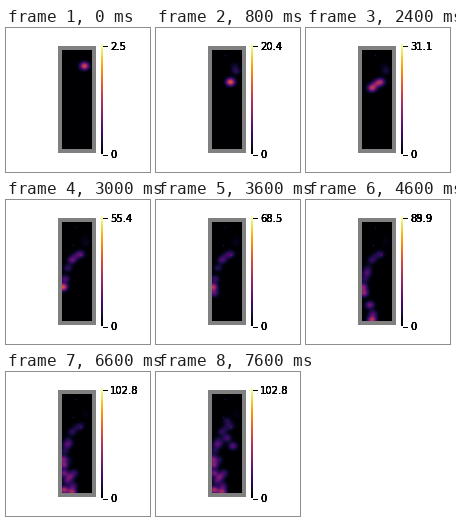
Write a matplotlib script that moves like this. It is 144 by 144 pixels and loops after 8000 ms.

```python
import numpy as np
import matplotlib.pyplot as plt
from matplotlib.animation import FuncAnimation
from matplotlib.patches import Rectangle

SIZE, STEP, LOOP = 144, 200, 8000
LEFT, RIGHT, TOP, BOTTOM = 56, 86, 22, 121
GROWTH = 400

# Deposits along the walk: time of full height, x, y, height
DEPOSITS = [
    (0, 78.5, 38, 1.4), (400, 80, 43, 3), (800, 74.5, 54, 12.5),
    (2200, 70, 56, 8), (2400, 66, 60, 15), (2800, 62, 68, 9),
    (3000, 59, 79, 13), (3000, 57, 87, 33),
    (3800, 58, 93, 34), (4000, 64, 105, 27), (4200, 67, 114, 20),
    (4400, 66, 120, 44), (4600, 61, 73, 20), (5400, 64, 71, 9),
    (5600, 61, 109, 20), (5800, 58, 118, 46),
    (6200, 58, 101, 30), (6400, 68, 101, 18), (6800, 63, 88, 12),
    (7200, 71, 66, 22), (7400, 77, 74, 26), (7600, 71, 49, 13),
]
SPECKS = [(200, 69, 27), (2600, 67, 45), (3000, 75, 55)]
SCALE = [(0, 2.5), (800, 20.4), (2400, 31.1), (3000, 55.4), (4400, 85.9),
         (4600, 89.9), (5800, 98.8), (6400, 102.8)]

xs, ys = np.meshgrid(np.arange(LEFT, RIGHT) + 0.5, np.arange(TOP, BOTTOM) + 0.5)


def bump(x, y, sx=3.0, sy=2.6):
    return np.exp(-((xs - x) / sx) ** 2 / 2 - ((ys - y) / sy) ** 2 / 2)


def clock(frame):
    t = frame * STEP
    return 1200 if 1200 <= t < 1800 else min(t, 7600)


def scale_max(t):
    return np.interp(t, *zip(*SCALE))


def density(t):
    field = sum(h * np.clip(1 + (t - full) / GROWTH, 0, 1) * bump(x, y)
                for full, x, y, h in DEPOSITS) / scale_max(t)
    return field + sum(0.13 * (t >= start) * bump(x + 0.5, y + 0.5, 0.6, 0.6)
                       for start, x, y in SPECKS)


fig = plt.figure(figsize=(2, 2), dpi=72, facecolor="white")
ax = fig.add_axes([0, 0, 1, 1])
ax.axis("off")

ax.add_patch(Rectangle((52, 17.5), 38, 107.5, color="#808080", lw=0))
heat = ax.imshow(density(0), cmap="inferno", vmin=0, vmax=1, aspect="auto",
                 extent=(LEFT, RIGHT, BOTTOM, TOP), interpolation="nearest", zorder=2)
ax.imshow(np.linspace(1, 0, 256)[:, None], cmap="inferno", aspect="auto",
          extent=(95, 97, 126.5, 17), interpolation="bilinear", zorder=2)
for y in (17.5, 126.5):
    ax.plot([97, 101], [y, y], color="black", lw=1)
ax.set(xlim=(0, SIZE), ylim=(SIZE, 0))


def heavy_label(y, text, layers=5):
    """Overprinted text, which hardens its soft edges."""
    return [ax.text(104, y, text, fontsize=10, family="DejaVu Sans",
                    va="center_baseline") for _ in range(layers)]


heavy_label(126.5, "0")
top_label = heavy_label(17.5, "")
ghost_label = heavy_label(17.5, "", 3)


def update(frame):
    t = clock(frame)
    heat.set_data(density(t))
    for label in top_label:
        label.set_text(f"{scale_max(t):.1f}")
    overlap = 4200 <= t < 6400
    for label in ghost_label:
        label.set_text(f"{scale_max(t - STEP):.1f}" if overlap else "")
    return [heat, *top_label, *ghost_label]


anim = FuncAnimation(fig, update, frames=LOOP // STEP, interval=STEP,
                     repeat=True, repeat_delay=0, blit=False)
plt.show()
```
